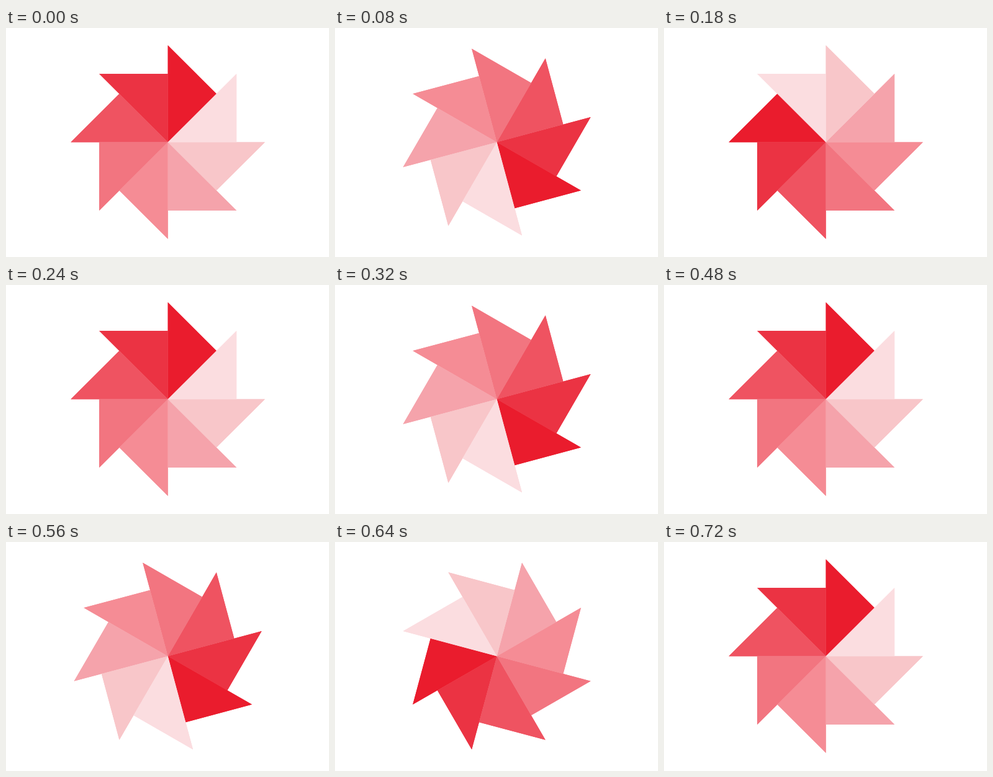
Recreate the animation shown at these times as an HTML page with a canvas. Size 520 by 370 pixels, loop 1.72 s.

```html
<!DOCTYPE html>
<html lang="en">
<head>
<meta charset="utf-8">
<title>Pinwheel</title>
<style>
  html, body { margin: 0; width: 100%; height: 100%; overflow: hidden; background: #fff; }
  canvas { display: block; }
</style>
</head>
<body>
<canvas id="stage" width="520" height="370"></canvas>
<script>
const ctx = document.getElementById('stage').getContext('2d');
const COLORS = ['#ea1c2d', '#eb3343', '#ef5361', '#f27580', '#f58c95', '#f5a3ab', '#f8c6c9', '#fbdde0'];
const LOOP = 1720, STEP = 20, SPIN_STEPS = 36;
const CENTER_X = 260.6, CENTER_Y = 184.4;
const TIP = 156.3, SHOULDER = TIP * Math.SQRT1_2;

function drawBlade(color, angle) {
  const end = angle + Math.PI / 4;
  ctx.fillStyle = color;
  ctx.beginPath();
  ctx.moveTo(0, 0);
  ctx.lineTo(TIP * Math.sin(angle), -TIP * Math.cos(angle));
  ctx.lineTo(SHOULDER * Math.sin(end), -SHOULDER * Math.cos(end));
  ctx.fill();
}

function draw(time) {
  // Three turns in 30 degree steps, then a rest until the loop ends.
  const step = Math.min(Math.floor(time % LOOP / STEP), SPIN_STEPS);
  const turn = step % 12 * Math.PI / 6;
  ctx.setTransform(1, 0, 0, 1, 0, 0);
  ctx.clearRect(0, 0, 520, 370);
  ctx.translate(CENTER_X, CENTER_Y);
  // The second pass closes the pale seams between neighbours.
  for (let pass = 0; pass < 2; pass++) {
    COLORS.forEach((color, i) => drawBlade(color, turn - i * Math.PI / 4));
  }
}

function tick() {
  draw(performance.now());
  requestAnimationFrame(tick);
}
tick();
</script>
</body>
</html>
```
